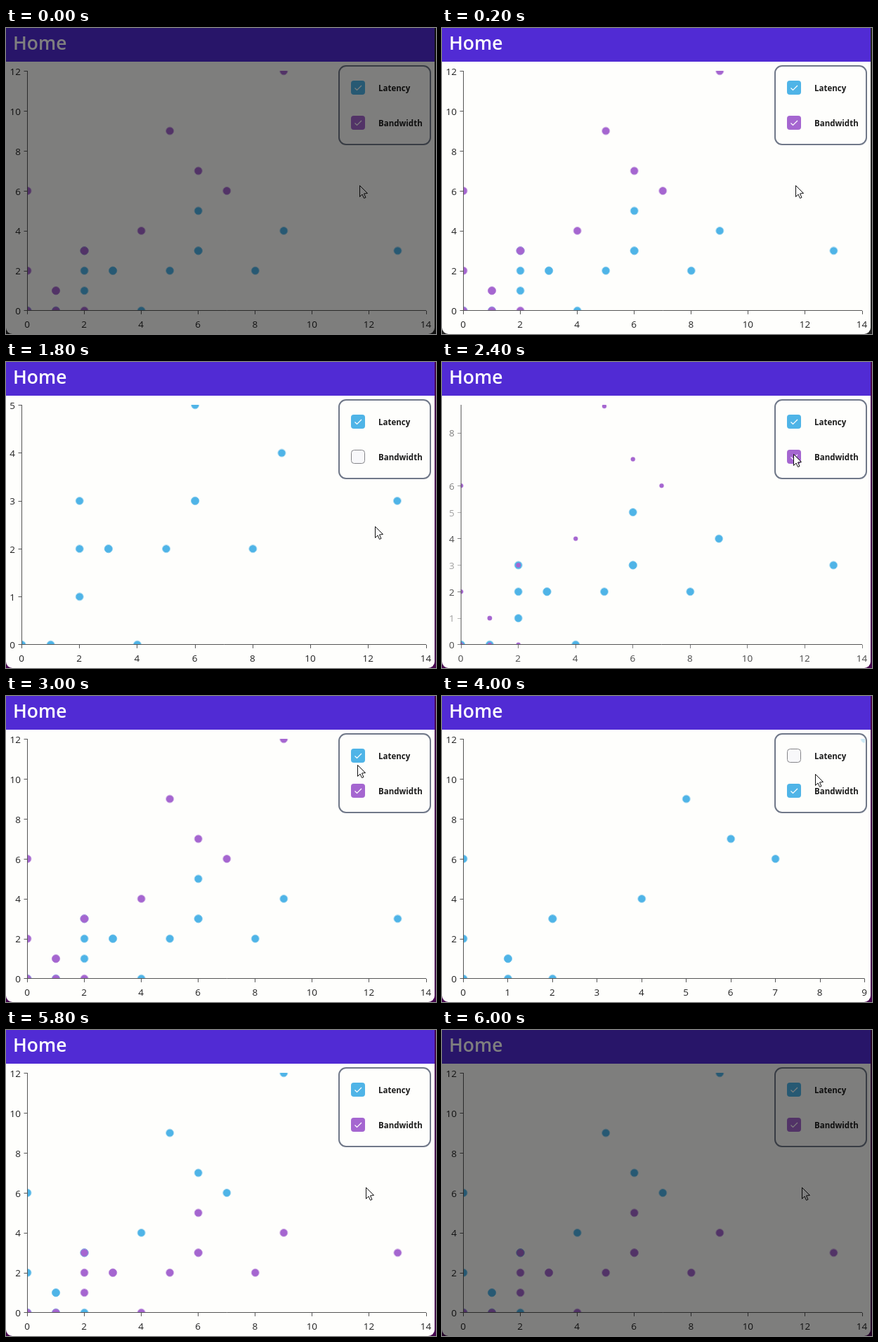
An HTML page with a canvas for the animation above (6.2 s loop, 612 by 436 pixels).

```html
<!DOCTYPE html>
<html lang="en">
<head>
<meta charset="utf-8">
<title>Scatter chart</title>
<style>
  html, body { margin: 0; width: 100%; height: 100%; overflow: hidden; background: #222; }
  canvas { display: block; }
</style>
</head>
<body>
<canvas id="stage" width="612" height="436"></canvas>
<script>
const ctx = document.getElementById('stage').getContext('2d');
const LOOP = 6200, STEP = 200, MORPH = 800;
const TOP = 61.5, BOTTOM = 402.9;
const FONT = '"Open Sans", "Noto Sans", sans-serif';
const COLORS = ['#4fb4e7', '#a566d0'];

// The y values found at x = 0, 1, 2, ...
const COLUMNS = {
  Latency: [[0], [0], [1, 2, 3], [2, 2], [0], [2], [3, 3, 5], [], [2], [4], [], [], [], [3]],
  Bandwidth: [[0, 2, 6], [0, 1, 1], [0, 3, 3], [], [4], [9], [7], [6], [], [12]]
};
const NAMES = Object.keys(COLUMNS);

// Axis ranges and margins follow from the visible series
function makeView(at, ...series) {
  const columns = series.map(n => COLUMNS[n]);
  const xTop = Math.max(...columns.map(c => c.length - 1));
  const yMax = Math.max(...columns.flat(2));
  const stepFor = max => max > 9 ? 2 : 1;
  const xStep = stepFor(xTop), yStep = stepFor(yMax);
  return {
    at, series, xStep, yStep, yMax,
    xMax: Math.ceil(xTop / xStep) * xStep,
    left: yMax > 9 ? 30.5 : 22.5,
    right: xTop > 9 ? 598 : 601.5
  };
}

// Series are named in drawing order, which also sets their colour
const VIEWS = [
  makeView(-MORPH, 'Latency', 'Bandwidth'),
  makeView(600, 'Latency'),
  makeView(2200, 'Latency', 'Bandwidth'),
  makeView(3200, 'Bandwidth'),
  makeView(4800, 'Bandwidth', 'Latency')
];

// time, x, y of the pointer tip
const STOPS = [
  [200, 503, 224], [600, 501, 136], [1400, 525, 234], [1800, 525, 234], [2200, 501, 136],
  [3200, 500, 94], [4000, 531, 111], [4800, 501, 90], [5800, 512, 224]
];

const mix = (a, b, p) => a + (b - a) * p;
const smooth = p => p * p * (3 - 2 * p);
const easeOut = p => 1 - (1 - p) ** 3;
const snap = v => Math.floor(v) + 0.5;

function text(str, x, y, font, color, align = 'left') {
  ctx.font = font + ' ' + FONT;
  ctx.fillStyle = color;
  ctx.textAlign = align;
  ctx.fillText(str, x, y);
}

function path(points, close) {
  ctx.beginPath();
  points.forEach(([x, y]) => ctx.lineTo(x, y));
  if (close) ctx.closePath();
}

function stroke(color, width = 1) {
  ctx.strokeStyle = color;
  ctx.lineWidth = width;
  ctx.stroke();
}

function line(x1, y1, x2, y2) {
  path([[x1, y1], [x2, y2]]);
  stroke('#555');
}

function box(x, y, w, h, r, fill) {
  ctx.beginPath();
  ctx.roundRect(x, y, w, h, r);
  ctx.fillStyle = fill;
  ctx.fill();
}

function dot(x, y, scale, color) {
  ctx.fillStyle = color;
  ctx.beginPath();
  ctx.arc(x, y, 5.2 * scale, 0, 7);
  ctx.fill();
  ctx.globalAlpha = 0.45;
  ctx.beginPath();
  ctx.arc(x, y, 5.6 * scale, 0, 7);
  stroke(color, scale);
  ctx.globalAlpha = 1;
}

function drawTicks(view, g, alpha) {
  ctx.globalAlpha = alpha;
  for (let v = 0; v <= Math.min(view.xMax, g.xMax + 0.05); v += view.xStep) {
    const x = snap(g.x(v));
    line(x, BOTTOM, x, BOTTOM + 5);
    text(v, g.x(v) - 0.5, 427, '13.5px', '#222', 'center');
  }
  for (let v = 0; v <= Math.min(view.yMax, g.yMax + 0.05); v += view.yStep) {
    const y = snap(g.y(v));
    line(g.left - 5, y, g.left, y);
    text(v, g.left - 9.5, g.y(v) + 5.3, '13.5px', '#222', 'right');
  }
  ctx.globalAlpha = 1;
}

function drawChart(from, to, p) {
  const g = {};
  for (const k of ['xMax', 'yMax', 'left', 'right']) g[k] = mix(from[k], to[k], p);
  g.x = v => mix(g.left, g.right, v / g.xMax);
  g.y = v => mix(BOTTOM, TOP, v / g.yMax);

  ctx.save();
  ctx.beginPath();
  ctx.rect(g.left - 0.5, TOP - 0.5, g.right - g.left + 1, BOTTOM - TOP + 0.5);
  ctx.clip();
  const gone = from.series.filter(n => !to.series.includes(n));
  for (const name of [...gone, ...to.series]) {
    const shown = to.series.includes(name);
    const scale = mix(+from.series.includes(name), +shown, p);
    const color = COLORS[(shown ? to : from).series.indexOf(name)];
    if (scale > 0) {
      COLUMNS[name].forEach((ys, x) => ys.forEach(y => dot(g.x(x), g.y(y) - 0.2, scale, color)));
    }
  }
  ctx.restore();

  const sameTicks = from.xStep === to.xStep && from.yStep === to.yStep;
  if (!sameTicks && p < 1) drawTicks(from, g, 1 - p);
  drawTicks(to, g, sameTicks ? 1 : p);
  line(g.left, TOP - 0.5, g.left, BOTTOM);
  line(g.left, snap(BOTTOM), g.right, snap(BOTTOM));
}

function drawLegend(shown) {
  box(474, 54, 130, 112, 10, 'rgba(255,255,253,.72)');
  stroke('#707889', 2);
  NAMES.forEach((name, i) => {
    const y = 75 + 50 * i;
    if (shown.includes(name)) {
      box(491, y, 20, 20, 4, COLORS[shown.length > 1 ? i : 0]);
      path([[496.5, y + 10.5], [499.5, y + 13.5], [506, y + 7]]);
      stroke('#fff', 1.2);
    } else {
      box(491.5, y + 0.5, 19, 19, 4, '#f8f8fa');
      stroke('#858589');
    }
    text(name, 530, y + 15, '700 11.5px', '#1c1c1c');
  });
}

function drawPointer(t) {
  const i = STOPS.findLastIndex(s => s[0] <= t);
  const a = STOPS[Math.max(i, 0)], b = STOPS[i + 1] || a;
  const p = a === b ? 0 : smooth((t - a[0]) / (b[0] - a[0]));
  ctx.save();
  ctx.translate(snap(mix(a[1], b[1], p)), snap(mix(a[2], b[2], p)));
  path([[0, 0], [0, 16], [3.5, 12.5], [6, 18], [8.5, 17], [6, 11.5], [11, 11]], true);
  ctx.fillStyle = '#fff';
  ctx.fill();
  stroke('#111');
  ctx.restore();
}

function draw(t) {
  const i = VIEWS.findLastIndex(v => v.at <= t);
  const to = VIEWS[i], from = VIEWS[Math.max(i - 1, 0)];
  const p = easeOut(Math.min((t - to.at) / MORPH, 1));

  ctx.fillStyle = t < 600 ? '#222' : '#46064f';
  ctx.fillRect(0, 0, 612, 436);
  box(0, 0, 610, 436, [0, 0, 9, 9], '#fefefc');
  ctx.fillStyle = '#512bd4';
  ctx.fillRect(0, 0, 610, 48);
  text('Home', 10, 31, '600 26.4px', '#fff');

  drawChart(from, to, p);
  drawLegend(to.series);
  drawPointer(t);

  if (t < 200 || t >= 6000) {
    ctx.fillStyle = 'rgba(0,0,0,.5)';
    ctx.fillRect(0, 0, 612, 436);
  }
}

const start = performance.now();
function tick() {
  const t = (performance.now() - start) % LOOP;
  draw(Math.floor(t / STEP) * STEP);
  requestAnimationFrame(tick);
}
tick();
</script>
</body>
</html>
```
